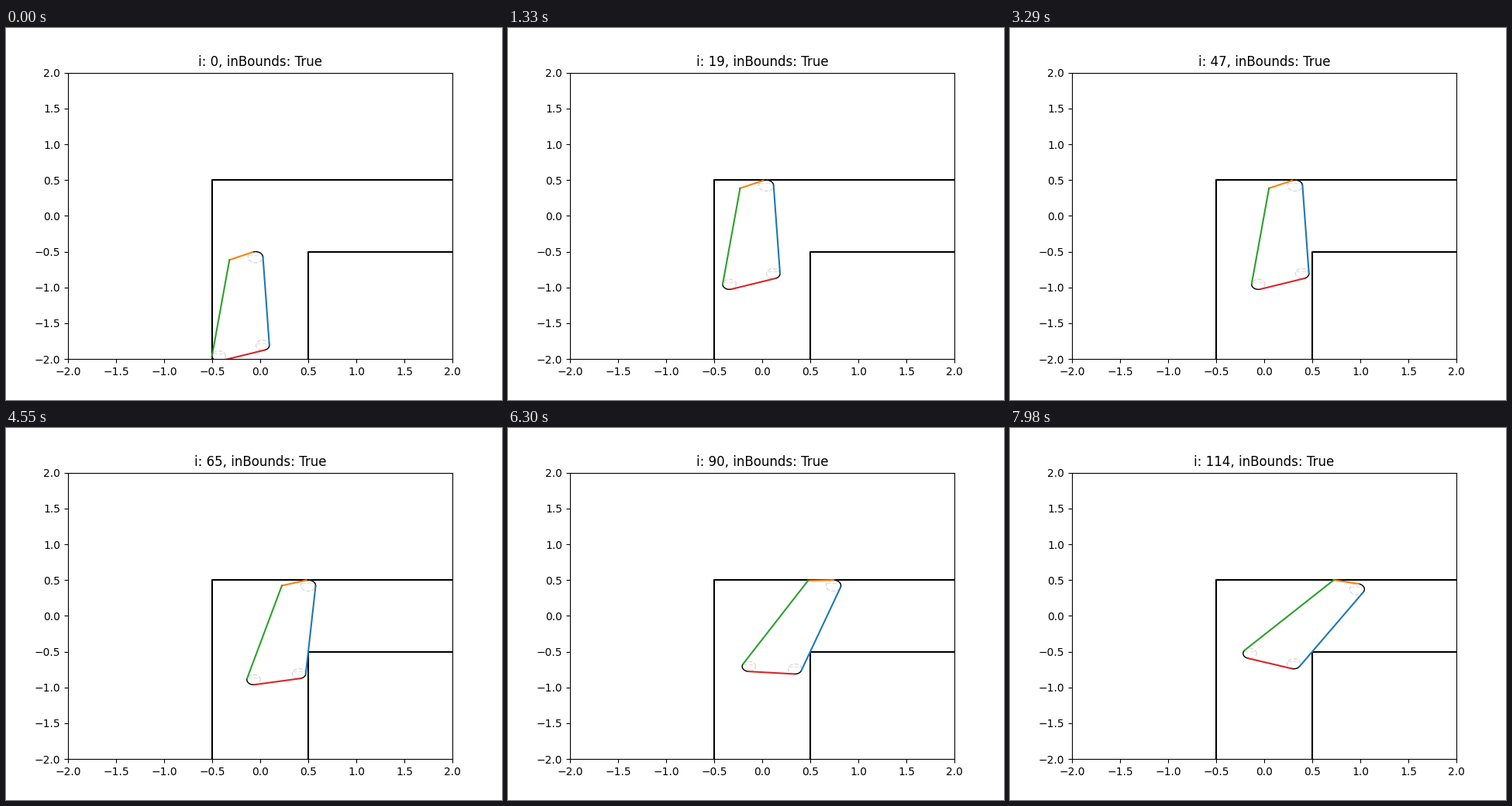
A matplotlib script that plays this animation: 640x480 px, repeating every 8000 ms.

```python
import numpy as np
import matplotlib.pyplot as plt
from matplotlib.animation import FuncAnimation

LOOP_MS = 8000
TICK_MS = 20
STEP_MS = 70

# Rounded corners clockwise: top left, top right, bottom right, bottom left
CENTRES = np.array([(-0.320, 0.385), (-0.0485, 0.423),
                    (0.0255, -0.807), (-0.431, -0.957)])
RADII = np.array([0.0, 0.077, 0.07, 0.07])
EDGE_COLORS = ["C1", "C0", "C3", "C2"]

PIVOT = np.array([0.5, -0.5])   # inner corner of the hallway
CEILING = 0.5
RISE_STEPS = 10
TURN_STEPS = [50.5, 65, 79, 101, 114]
TURN_ANGLES = [0, -7.9, -16.1, -28.8, -35.7]


def polar(angle):
    return np.stack([np.cos(angle), np.sin(angle)], axis=-1)


def edge_normals(pts):
    """Outward normal angle of each tangent from one corner to the next."""
    nxt = np.roll(pts, -1, axis=0) - pts
    gap = RADII - np.roll(RADII, -1)
    heading = np.arctan2(nxt[:, 1], nxt[:, 0])
    return heading + np.arccos(gap / np.hypot(nxt[:, 0], nxt[:, 1]))


def pose(step):
    if step <= TURN_STEPS[0]:
        shift = (0.01 * max(step - RISE_STEPS, 0),
                 0.1 * min(step, RISE_STEPS) - 1)
        return CENTRES + shift

    # Turn while touching both the ceiling and the inner corner
    a = np.radians(np.interp(step, TURN_STEPS, TURN_ANGLES))
    rot = np.array([[np.cos(a), -np.sin(a)], [np.sin(a), np.cos(a)]])
    pts = CENTRES @ rot.T
    pts[:, 1] += CEILING - np.max(pts[:, 1] + RADII)
    n = polar(edge_normals(pts)[1])
    if n[1] > 0:
        dx = PIVOT[0] - pts[2, 0] - RADII[2]
    else:
        dx = (n @ (PIVOT - pts[2]) - RADII[2]) / n[0]
    pts[:, 0] += dx
    return pts


fig, ax = plt.subplots(figsize=(6.4, 4.8), dpi=100)
ax.set_xlim(-2, 2)
ax.set_ylim(-2, 2)
title = ax.set_title("")

ax.plot([-0.5, -0.5, 2], [-2, 0.5, 0.5], "k")
ax.plot([0.5, 0.5, 2], [-2, -0.5, -0.5], "k")

rings, chords, arcs = [], [], []
for _ in range(3):
    rings += ax.plot([], [], "--", color="#dcd8d8", lw=1)
    chords += ax.plot([], [], "--", color="#f3dcdc", lw=1)
    arcs += ax.plot([], [], "k", lw=1)
edges = [ax.plot([], [], color=c)[0] for c in EDGE_COLORS]

CIRCLE = polar(np.linspace(0, 2 * np.pi, 60))
CHORD = np.array([(-0.9, 0.43), (0.9, 0.43)])


def update(frame):
    step = (frame * TICK_MS + TICK_MS // 2) // STEP_MS
    pts = pose(step)
    normals = edge_normals(pts)
    title.set_text(f"i: {step}, inBounds: True")

    for k, edge in enumerate(edges):
        j = (k + 1) % 4
        n = polar(normals[k])
        edge.set_data(*np.array([pts[k] + RADII[k] * n,
                                 pts[j] + RADII[j] * n]).T)

    for k in range(1, 4):
        c, r = pts[k], RADII[k]
        start = normals[k - 1]
        sweep = (start - normals[k]) % (2 * np.pi)
        bend = polar(np.linspace(start, start - sweep, 30))
        arcs[k - 1].set_data(*(c + r * bend).T)
        rings[k - 1].set_data(*(c + r * CIRCLE).T)
        chords[k - 1].set_data(*(c + r * CHORD).T)
    return [title, *rings, *chords, *arcs, *edges]


anim = FuncAnimation(fig, update, frames=LOOP_MS // TICK_MS,
                     interval=TICK_MS, repeat=True, repeat_delay=0)
plt.show()
```
